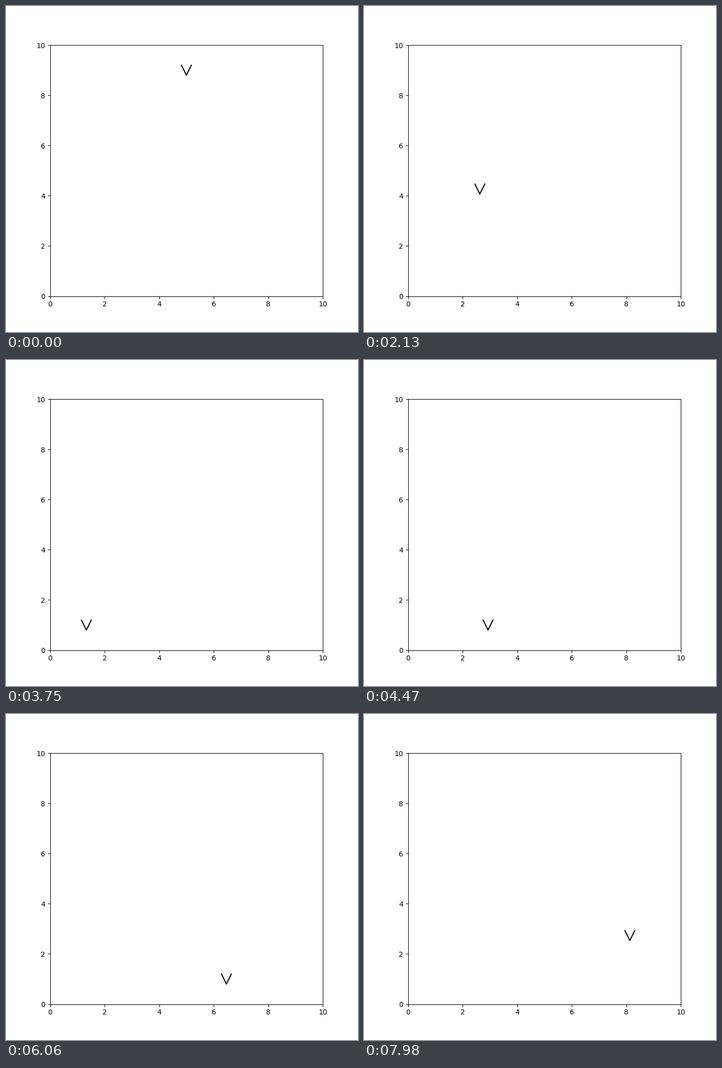
A matplotlib script that plays this animation: 700x650 px, repeating every 8000 ms.

```python
import matplotlib.pyplot as plt
import numpy as np
from matplotlib.animation import FuncAnimation

LOOP_MS = 8000
FRAMES = 267
STEPS_PER_SIDE = 120

CORNERS = np.array([(5, 9), (1, 1), (9, 1)], dtype=float)
# V shape around its centre, in data units
V_X = np.array([-0.18, 0, 0.18])
V_Y = np.array([0.2, -0.2, 0.2])


def position(step):
    """Point on the triangle, moving linearly from corner to corner."""
    side, k = divmod(step, STEPS_PER_SIDE)
    start = CORNERS[side % 3]
    end = CORNERS[(side + 1) % 3]
    return start + (end - start) * k / STEPS_PER_SIDE


fig, ax = plt.subplots(figsize=(7, 6.5), dpi=100)
ax.set_xlim(0, 10)
ax.set_ylim(0, 10)
bird, = ax.plot([], [], color="black", lw=1.5)


def update(step):
    x, y = position(step)
    bird.set_data(x + V_X, y + V_Y)
    return bird,


def init():
    return update(0)


anim = FuncAnimation(fig, update, frames=FRAMES, init_func=init,
                     interval=LOOP_MS / FRAMES, repeat=True)
plt.show()
```
